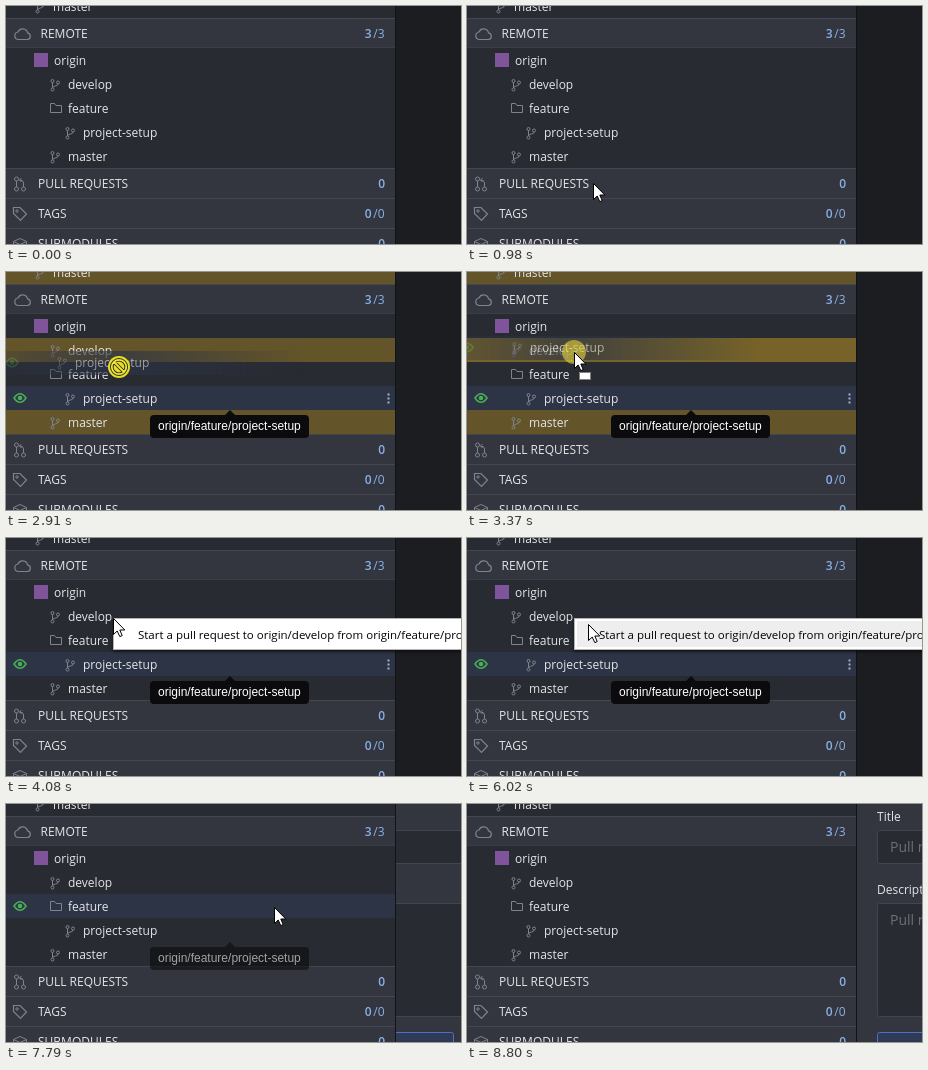
An HTML page with a canvas that plays this animation: 455 px wide and 238 px high, repeating every 9120 ms.

```html
<!DOCTYPE html>
<html lang="en">
<head>
<meta charset="utf-8">
<title>Branch drag to pull request</title>
<style>
html, body { margin: 0; width: 455px; height: 238px; overflow: hidden; background: #1c1d21; }
canvas { display: block; }
</style>
</head>
<body>
<canvas id="stage" width="455" height="238"></canvas>
<script>
const W = 455, H = 238, SIDE = 389, LOOP = 9120;
const ROW = 24, LIST_TOP = 42;
const ctx = document.getElementById('stage').getContext('2d');
const ghostCanvas = document.createElement('canvas');
ghostCanvas.width = SIDE;
ghostCanvas.height = ROW;
const ghostCtx = ghostCanvas.getContext('2d');

const UI = '"Open Sans", sans-serif';
const C = {
  list: '#282b32', head: '#33363f', line: '#44474f', text: '#e4e5e7', icon: '#80838b',
  blue: '#8ab0e6', hover: '#2c3446', back: '#1c1d21', gold: '#645429', green: '#4aae55'
};

// Pointer legs: start, end, number of steps, target x, target y
const LEGS = [
  [660, 1070, 6, 122, 146],
  [1210, 1290, 2, 121, 130],
  [2910, 2910, 1, 113, 95],
  [2990, 2990, 1, 107, 82],
  [3370, 3370, 1, 107, 80],
  [6020, 6020, 1, 121, 86],
  [6090, 6560, 7, 264, 107],
  [6720, 6950, 4, 268, 103],
  [7870, 8400, 7, 468, 142]
];

// Progress in n equal jumps, the first at a and the last at b
function steps(t, a, b, n) {
  if (t < a) return 0;
  if (t >= b) return 1;
  return (Math.floor((t - a) / (b - a) * (n - 1)) + 1) / n;
}

function pointer(t) {
  let x = 134, y = 240;
  for (const [a, b, n, tx, ty] of LEGS) {
    const p = steps(t, a, b, n);
    x += (tx - x) * p;
    y += (ty - y) * p;
  }
  return { x: Math.round(x), y: Math.round(y) };
}

function rect(x, y, w, h, color, g = ctx) {
  g.fillStyle = color;
  g.fillRect(x, y, w, h);
}

function text(str, x, y, color = C.text, font = '12px ' + UI, g = ctx) {
  g.font = font;
  g.fillStyle = color;
  g.fillText(str, x, y);
}

function stroke(d, x, y, color = C.icon, width = 1, g = ctx) {
  g.save();
  g.translate(x, y);
  g.strokeStyle = color;
  g.lineWidth = width;
  g.stroke(new Path2D(d));
  g.restore();
}

function ring(x, y, r, color = C.icon, g = ctx) {
  g.beginPath();
  g.arc(x, y, r, 0, 7);
  g.strokeStyle = color;
  g.lineWidth = 1;
  g.stroke();
}

function disc(x, y, r, color, g = ctx) {
  g.beginPath();
  g.arc(x, y, r, 0, 7);
  g.fillStyle = color;
  g.fill();
}

function branch(x, y, g = ctx) {
  ring(x + 2.5, y - 4, 1.5, C.icon, g);
  ring(x + 2.5, y + 4.5, 1.5, C.icon, g);
  ring(x + 8, y - 2.5, 1.5, C.icon, g);
  stroke('M2.5 -2.5V3M8 -1C8 2 3 0 2.5 3', x, y, C.icon, 1, g);
}

function eye(y, g = ctx) {
  stroke('M-6 0Q0 -8.5 6 0Q0 8.5 -6 0Z', 14, y, C.green, 1.6, g);
  disc(14, y, 2.3, C.green, g);
}

function dots(y) {
  for (const d of [-4, 0, 4]) rect(381.5, y + d - 1, 2, 2, '#a3b2cc');
}

function header(y, label, x, count) {
  rect(0, y, SIDE, 30, C.head);
  rect(0, y, SIDE, 1, C.line);
  text(label, x, y + 20);
  const [a, b] = count.split('/');
  const bold = '600 12px ' + UI;
  ctx.textAlign = 'right';
  if (b) {
    text('/' + b, 378.5, y + 20, C.blue);
    text(a, 365.5, y + 20, C.blue, bold);
  } else {
    text(a, 379, y + 20, C.blue, bold);
  }
  ctx.textAlign = 'left';
}

function sidebar(row, gold, target) {
  const open = row >= 2 && row <= 4;
  const top = LIST_TOP + row * ROW;
  rect(0, 0, SIDE, H, C.list);
  if (open) rect(0, top, SIDE, ROW, C.hover);

  ctx.globalAlpha = gold;
  rect(0, 0, SIDE, 12, C.gold);
  rect(0, LIST_TOP + ROW, SIDE, ROW, target ? '#776329' : C.gold);
  rect(0, LIST_TOP + 4 * ROW, SIDE, ROW, C.gold);
  ctx.globalAlpha = 1;

  branch(29, 1);
  text('master', 47, 5);
  header(12, 'REMOTE', 34.5, '3/3');
  rect(0, 41, SIDE, 1, '#3a3d46');
  stroke('M5 12H14.5A3.4 3.4 0 0 0 14.5 5.3A5 5 0 0 0 5 4.5A3.8 3.8 0 0 0 5 12Z', 7, 21.5, C.icon, 1.2);

  rect(28, 47, 14, 14, '#80549a');
  text('origin', 48, 59);
  branch(44, 79);
  text('develop', 62, 83);
  stroke('M.5 9.5V.5H4.5L6 2.5H11.5V9.5Z', 44, 97);
  text('feature', 62, 107);
  branch(59, 127);
  text('project-setup', 77, 131);
  branch(44, 151);
  text('master', 62, 155);

  if (open) eye(top + 12);
  if (open && row > 2) dots(top + 12.5);

  header(162, 'PULL REQUESTS', 32, '0');
  ring(10.5, 173, 2);
  ring(10.5, 183, 2);
  ring(17.5, 183, 2);
  stroke('M10.5 175V181M17.5 181V177Q17.5 174 13.5 174M15.5 172L13.5 174L15.5 176', 0, 0);
  header(192, 'TAGS', 32, '0/0');
  stroke('M.5 .5H7L13.5 7L7.5 13.5L.5 6.5Z', 7, 201, C.icon, 1.2);
  ring(11, 205, 1.2);
  header(222, 'SUBMODULES', 32, '0');
  stroke('M7 .5L13.5 3.5L7 6.5L.5 3.5ZM.5 3.5V10M13.5 3.5V10M7 6.5V12', 7, 232);
  rect(SIDE, 0, 1, H, '#121316');
}

function box(x, y, w, h, fill, line) {
  ctx.beginPath();
  ctx.roundRect(x + .5, y + .5, w, h, 2);
  ctx.fillStyle = fill;
  ctx.fill();
  ctx.strokeStyle = line;
  ctx.lineWidth = 1;
  ctx.stroke();
}

// Form springs in from behind the sidebar
function form(t) {
  if (t < 7790) return;
  const u = t < 8740 ? Math.floor((t - 7790) / 78) * 78 : t < 8800 ? 950 : 2000;
  const dx = -230 * Math.exp(-u / 190) * Math.cos(u * Math.PI / 660);
  ctx.save();
  ctx.beginPath();
  ctx.rect(SIDE + 1, 0, W, H);
  ctx.clip();
  rect(SIDE + 1, 0, W, H, C.head);
  ctx.translate(dx, 0);
  text('Title', 410, 17);
  box(410, 26, 420, 33, C.list, '#42454e');
  text('Pull request title', 423, 48, '#6d7079', '14px ' + UI);
  text('Description', 410, 90);
  box(410, 99, 420, 113, C.list, '#42454e');
  text('Pull request description', 423, 121, '#6d7079', '14px ' + UI);
  box(410, 228, 267, 34, '#303a55', '#4a6fd0');
  ctx.restore();
}

function tooltip(alpha) {
  if (!alpha) return;
  ctx.globalAlpha = alpha;
  ctx.beginPath();
  ctx.roundRect(144, 143, 159, 23, 4);
  ctx.moveTo(219, 143);
  ctx.lineTo(224, 138);
  ctx.lineTo(229, 143);
  ctx.fillStyle = '#0b0b0d';
  ctx.fill();
  text('origin/feature/project-setup', 152, 158, '#fff', '12px "Liberation Sans", Arial, sans-serif');
  ctx.globalAlpha = 1;
}

function menu(hot) {
  ctx.save();
  ctx.shadowColor = 'rgba(0,0,0,.5)';
  ctx.shadowBlur = 3;
  ctx.shadowOffsetY = 2;
  rect(107, 80, W, 32, '#b4b4b4');
  ctx.restore();
  rect(108, 81, W, 30, '#fff');
  if (hot) rect(110, 83, W, 26, '#eee');
  text('Start a pull request to origin/develop from origin/feature/project-setup',
    132, 101, '#000', '11.5px ' + UI);
}

// Faded copy of the dragged row
function ghost(p) {
  const g = ghostCtx;
  g.globalCompositeOperation = 'source-over';
  g.clearRect(0, 0, SIDE, ROW);
  rect(0, 0, SIDE, ROW, C.hover, g);
  eye(11.5, g);
  branch(59, 12, g);
  text('project-setup', 77, 16, C.text, '12px ' + UI, g);
  const fade = g.createRadialGradient(121, 16, 0, 121, 16, 185);
  fade.addColorStop(0, 'rgba(0,0,0,.7)');
  fade.addColorStop(1, 'rgba(0,0,0,0)');
  g.globalCompositeOperation = 'destination-in';
  rect(0, 0, SIDE, ROW, fade, g);
  ctx.drawImage(ghostCanvas, p.x - 121, p.y - 16);
}

function arrow({ x, y }) {
  const path = new Path2D('M.5 .5V16.5L4.2 13L6.8 18.6L9.2 17.6L6.8 12H11.8Z');
  ctx.save();
  ctx.translate(x, y);
  ctx.fillStyle = '#fff';
  ctx.fill(path);
  ctx.strokeStyle = '#000';
  ctx.lineWidth = 1;
  ctx.stroke(path);
  ctx.restore();
}

function denied({ x, y }) {
  disc(x, y, 11, '#e6dc2c');
  ctx.lineWidth = 3.6;
  ctx.strokeStyle = '#2a2808';
  ctx.beginPath();
  ctx.arc(x, y, 7.2, 0, 7);
  ctx.moveTo(x - 5, y - 5);
  ctx.lineTo(x + 5, y + 5);
  ctx.stroke();
  ctx.lineWidth = 1.8;
  ctx.strokeStyle = '#f0e640';
  ctx.stroke();
}

function moveBox({ x, y }) {
  rect(x + 5, y + 20, 12, 8, '#fff');
  ctx.setLineDash([1, 1]);
  ctx.lineWidth = 1;
  ctx.strokeStyle = '#000';
  ctx.strokeRect(x + 5.5, y + 20.5, 11, 7);
  ctx.setLineDash([]);
}

function hoverRow(t, p) {
  if (t >= 1290 && t < 7790) return 3;
  return p.x < SIDE ? Math.floor((p.y - LIST_TOP) / ROW) : -1;
}

function tipAlpha(t) {
  if (t < 7790) return [0, .55, .8, 1][Math.round(steps(t, 1900, 2070, 3) * 3)];
  return t < 7870 ? .6 : t < 7950 ? .25 : 0;
}

function draw(t) {
  const p = pointer(t);
  const drag = t >= 2450 && t < 4000;
  const pressed = (t >= 1985 && t < 4000) || (t >= 7560 && t < 7640);
  const gold = t < 4000 ? steps(t, 2450, 2680, 4) : t < 4080 ? .5 : 0;

  rect(0, 0, W, H, C.back);
  form(t);
  sidebar(hoverRow(t, p), gold, t >= 2990 && t < 4000);
  tooltip(tipAlpha(t));
  if (t >= 4080 && t < 7640) menu(t >= 6020);
  if (drag) ghost(p);

  if (t >= 2910 && t < 2990) {
    denied(p);
  } else if (t >= 660 && t < 8480) {
    if (pressed) disc(p.x, p.y, 12, 'rgba(232,214,60,.6)');
    arrow(p);
    if (drag) moveBox(p);
  }
}

const start = performance.now();
function tick() {
  draw((performance.now() - start) % LOOP);
  requestAnimationFrame(tick);
}
tick();
</script>
</body>
</html>
```
